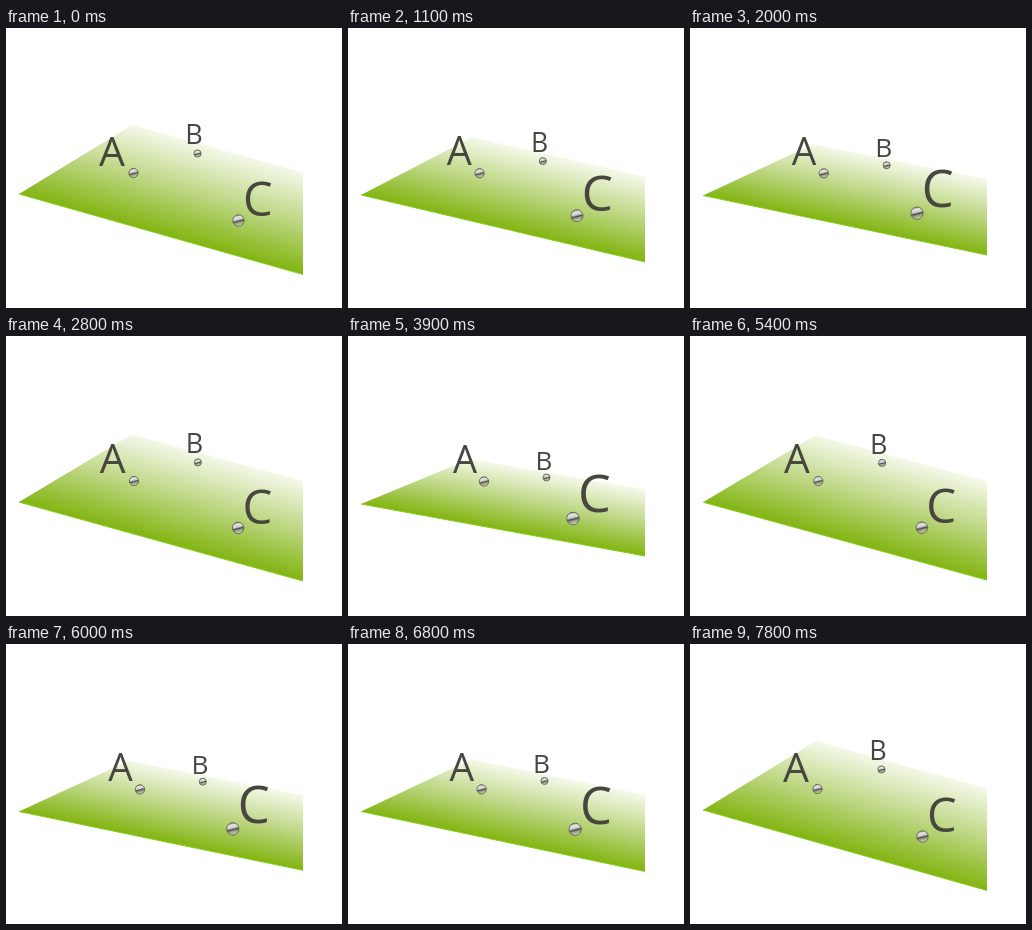
An HTML page that plays this animation: 336 px wide and 280 px high, repeating every 7900 ms.

```html
<!DOCTYPE html>
<html lang="en">
<head>
<meta charset="utf-8">
<title>Tilting plane</title>
<style>
  html, body { margin: 0; width: 100%; height: 100%; overflow: hidden; background: #fff; }
  svg { display: block; width: 336px; height: 280px; }
  text { font-family: "Open Sans", "Noto Sans", sans-serif; fill: #47463f; }
</style>
</head>
<body>
<svg viewBox="0 0 336 280">
  <defs>
    <linearGradient id="grass" gradientUnits="userSpaceOnUse">
      <stop offset="0" stop-color="#f4f8e8"/>
      <stop offset=".2" stop-color="#deebc0"/>
      <stop offset=".5" stop-color="#bdd682"/>
      <stop offset=".8" stop-color="#99c23e"/>
      <stop offset="1" stop-color="#83b412"/>
    </linearGradient>
    <linearGradient id="glass" x1=".35" y1="0" x2=".6" y2="1">
      <stop offset="0" stop-color="#858585"/>
      <stop offset=".2" stop-color="#e4e4e4"/>
      <stop offset=".42" stop-color="#cfcfcf"/>
      <stop offset=".56" stop-color="#4c4c4c"/>
      <stop offset=".68" stop-color="#929b7c"/>
      <stop offset="1" stop-color="#d5dfbc"/>
    </linearGradient>
  </defs>
  <polygon id="plane" fill="url(#grass)"/>
  <line id="edge" stroke="#82cf1c" stroke-width="1"/>
  <g id="marks"></g>
</svg>
<script>
const LOOP = 7900, STEP = 100;
const HIGH = 246.5, LOW = 220;

// [time in ms, height of the near right corner]
const keys = [
  [0, 246.5], [200, 246.5], [1000, 236.5], [1600, 218], [2000, 227], [2600, 240.8],
  [2800, 245], [2950, 246.5], [3400, 235.7], [3900, 220], [4050, 218.5], [4700, 236.3],
  [5000, 242.7], [5200, 246.5], [5800, 232.7], [6000, 226.3], [6350, 218], [7400, 244.8],
  [7700, 246.5], [LOOP, 246.5]
];

// Each pair holds the value at the steepest and at the flattest tilt.
const corners = { leftY: [166, 168], backX: [126, 122], backY: [97, 123], rightY: [144.5, 153.5] };
const marks = [
  { name: "A", x: [127.5, 136], y: [145, 145.5], r: [4.6, 4.7], tx: [93, 105], ty: [137.5, 137.3], size: [41, 38] },
  { name: "B", x: [191.5, 198.5], y: [125.5, 141.5], r: [3.6, 3.5], tx: [179.2, 187.4], ty: [116, 133.8], size: [27, 26] },
  { name: "C", x: [232.5, 225], y: [192.5, 182.5], r: [5.7, 6.3], tx: [237, 230], ty: [188.3, 176.3], size: [47, 52] }
];

const $ = id => document.getElementById(id);
const set = (el, attrs) => { for (const a in attrs) el.setAttribute(a, attrs[a]); };
const mix = ([a, b], k) => a + (b - a) * k;

function add(tag, attrs) {
  const el = document.createElementNS("http://www.w3.org/2000/svg", tag);
  set(el, attrs);
  return $("marks").appendChild(el);
}

for (const m of marks) {
  m.ball = add("circle", { fill: "url(#glass)", stroke: "#5d6153", "stroke-width": 0.9 });
  m.label = add("text", {});
  m.label.textContent = m.name;
}

// Monotone cubic interpolation: flat at turning points, smooth elsewhere.
const secant = i => (keys[i + 1][1] - keys[i][1]) / (keys[i + 1][0] - keys[i][0]);
function slope(i) {
  if (i === 0 || i === keys.length - 1) return 0;
  const a = secant(i - 1), b = secant(i);
  return a * b <= 0 ? 0 : 2 * a * b / (a + b);
}
function height(t) {
  let i = 0;
  while (i < keys.length - 2 && t >= keys[i + 1][0]) i++;
  const [t0, y0] = keys[i], [t1, y1] = keys[i + 1];
  const d = t1 - t0, u = (t - t0) / d, v = 1 - u;
  return y0 * v * v * (1 + 2 * u) + y1 * u * u * (3 - 2 * u)
    + d * u * v * (slope(i) * v - slope(i + 1) * u);
}

function draw(t) {
  const near = height(t);
  const k = (HIGH - near) / (HIGH - LOW);
  const left = 13, right = 297;
  const leftY = mix(corners.leftY, k), rightY = mix(corners.rightY, k);
  const backX = mix(corners.backX, k), backY = mix(corners.backY, k);
  set($("plane"), { points: [left, leftY, backX, backY, right, rightY, right, near].join(" ") });
  set($("edge"), { x1: left, y1: leftY, x2: right, y2: near });

  // The shading runs square to the near edge.
  const dx = right - left, dy = near - leftY;
  const s = (dx * (backY - leftY) - dy * (backX - left)) / (dx * dx + dy * dy);
  set($("grass"), { x1: backX, y1: backY, x2: backX + dy * s, y2: backY - dx * s });

  for (const m of marks) {
    set(m.ball, { cx: mix(m.x, k), cy: mix(m.y, k), r: mix(m.r, k) });
    set(m.label, { x: mix(m.tx, k), y: mix(m.ty, k), "font-size": mix(m.size, k) });
  }
}

const start = performance.now();
function tick() {
  const t = Math.max(0, performance.now() - start) % LOOP;
  draw(Math.floor(t / STEP) * STEP);
  requestAnimationFrame(tick);
}
tick();
</script>
</body>
</html>
```
